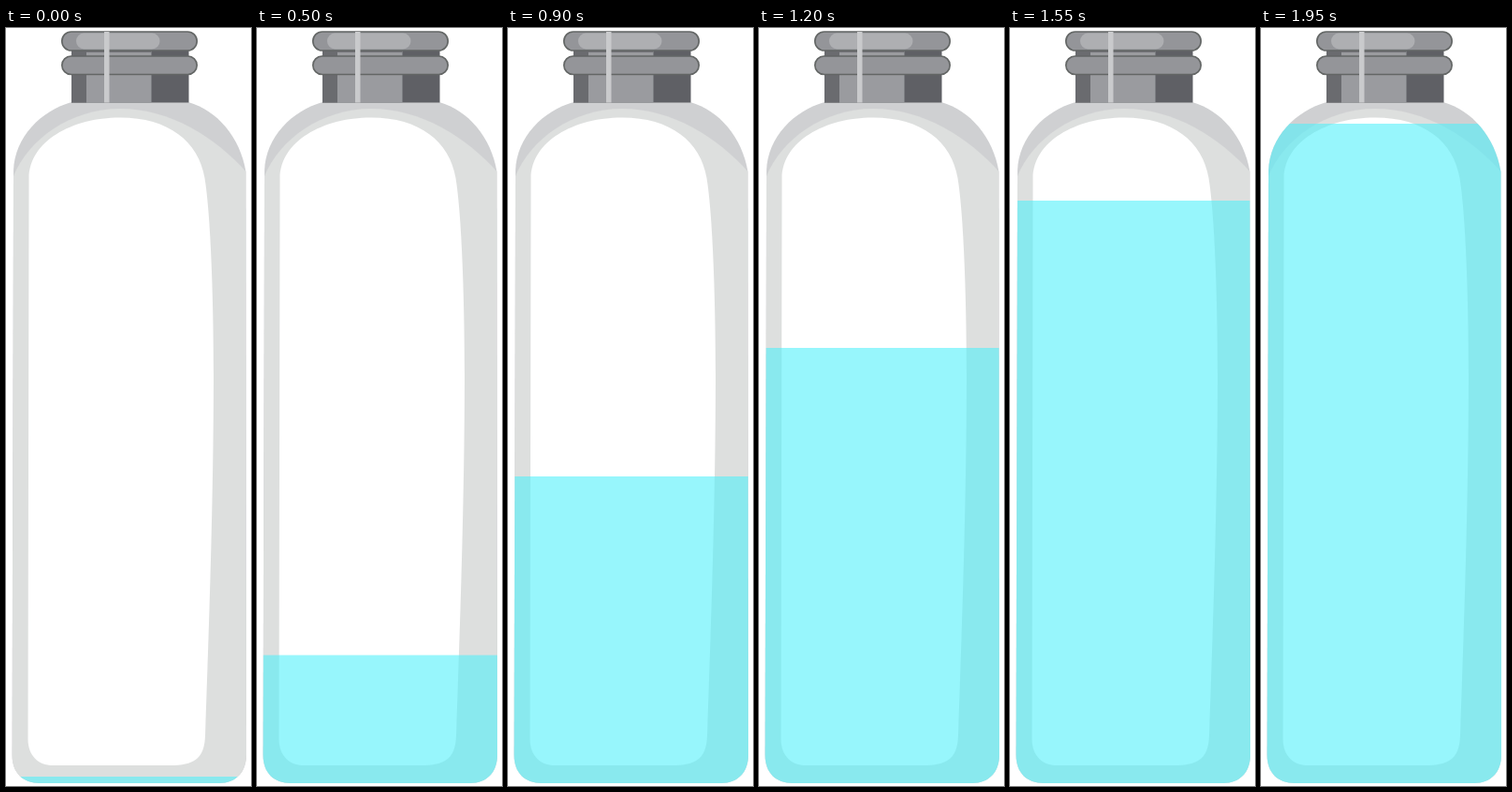
An HTML page with a canvas that plays this animation: 262 px wide and 808 px high, repeating every 2000 ms.

```html
<!DOCTYPE html>
<html lang="en">
<head>
<meta charset="utf-8">
<title>Filling bottle</title>
<style>
html, body { margin: 0; width: 100%; height: 100%; overflow: hidden; background: #fff; }
canvas { display: block; width: 262px; height: 808px; }
</style>
</head>
<body>
<canvas id="stage" width="262" height="808"></canvas>
<script>
const ctx = document.getElementById('stage').getContext('2d');
const LOOP = 2000, STEP = 50;

// time, surface height, upward speed in px/ms
const KEYS = [
  [0, 798, 0.02], [300, 751, 0.37], [650, 599, 0.475], [900, 478, 0.475],
  [1200, 341, 0.455], [1550, 184, 0.42], [1950, 102, 0]
];

const body = new Path2D(`M70 79 C38 88 9 116 8 152 L6.5 775
  C6.5 794 18 805 36 805 L228 805 C246 805 257 793 257 775
  L256.5 153 C250 116 226 88 195 79 Z`);
const wall = new Path2D(`M8 158 C24 118 70 86 122 86 C176 86 224 117 256.5 153
  L257 775 C257 793 246 805 228 805 L36 805 C18 805 6.5 794 6.5 775 Z`);
const hollow = new Path2D(`M24.5 160 C25 121 70 95.5 122 95.5
  C174 95.5 206 121 212.5 160 C219 200 222 290 222 370
  C222 500 217 640 213 755 C212 776 204 785 180 786
  L50 786 C35 786 23.5 776 23.5 758 Z`);

function rect(x, y, w, h, color) {
  ctx.fillStyle = color;
  ctx.fillRect(x, y, w, h);
}

function pill(x, y, w, h, fill, line) {
  ctx.beginPath();
  ctx.roundRect(x, y, w, h, h / 2);
  ctx.fillStyle = fill;
  ctx.fill();
  if (!line) return;
  ctx.strokeStyle = line;
  ctx.lineWidth = 1.6;
  ctx.stroke();
}

function fillPath(path, color) {
  ctx.fillStyle = color;
  ctx.fill(path);
}

function drawNeck() {
  rect(70, 22, 125.5, 57.5, '#5f6065');
  rect(70, 22, 16, 57.5, '#6a6b6f');
  rect(86, 22, 69.5, 57.5, '#9a9b9f');
  rect(86, 24, 69.5, 2, '#707175');
  pill(59.8, 4, 144.4, 20, '#949599', '#636665');
  pill(75, 5.5, 89.5, 17, '#aeafb2');
  pill(59.8, 30, 144.4, 19.5, '#949599', '#636665');
  rect(105, 4, 5.5, 75.5, '#c9cacc');
}

function surface(t) {
  let i = 0;
  while (i < KEYS.length - 2 && t > KEYS[i + 1][0]) i++;
  const [t0, y0, v0] = KEYS[i], [t1, y1, v1] = KEYS[i + 1];
  const d = t1 - t0, s = Math.min(1, (t - t0) / d);
  const ease = s * s * (3 - 2 * s);
  return y0 + (y1 - y0) * ease
    - d * (v0 * s * (1 - s) ** 2 - v1 * s * s * (1 - s));
}

function draw(t) {
  rect(0, 0, 262, 808, '#fff');
  fillPath(body, '#cfd0d2');
  ctx.save();
  ctx.clip(body);
  fillPath(wall, '#dddfde');
  fillPath(hollow, '#fff');
  const y = surface(t);
  rect(0, y, 262, 808 - y, 'rgba(82,240,250,0.6)');
  ctx.restore();
  drawNeck();
}

const start = performance.now();
function tick() {
  const t = (performance.now() - start) % LOOP;
  draw(Math.floor(t / STEP) * STEP);
  requestAnimationFrame(tick);
}
tick();
</script>
</body>
</html>
```
